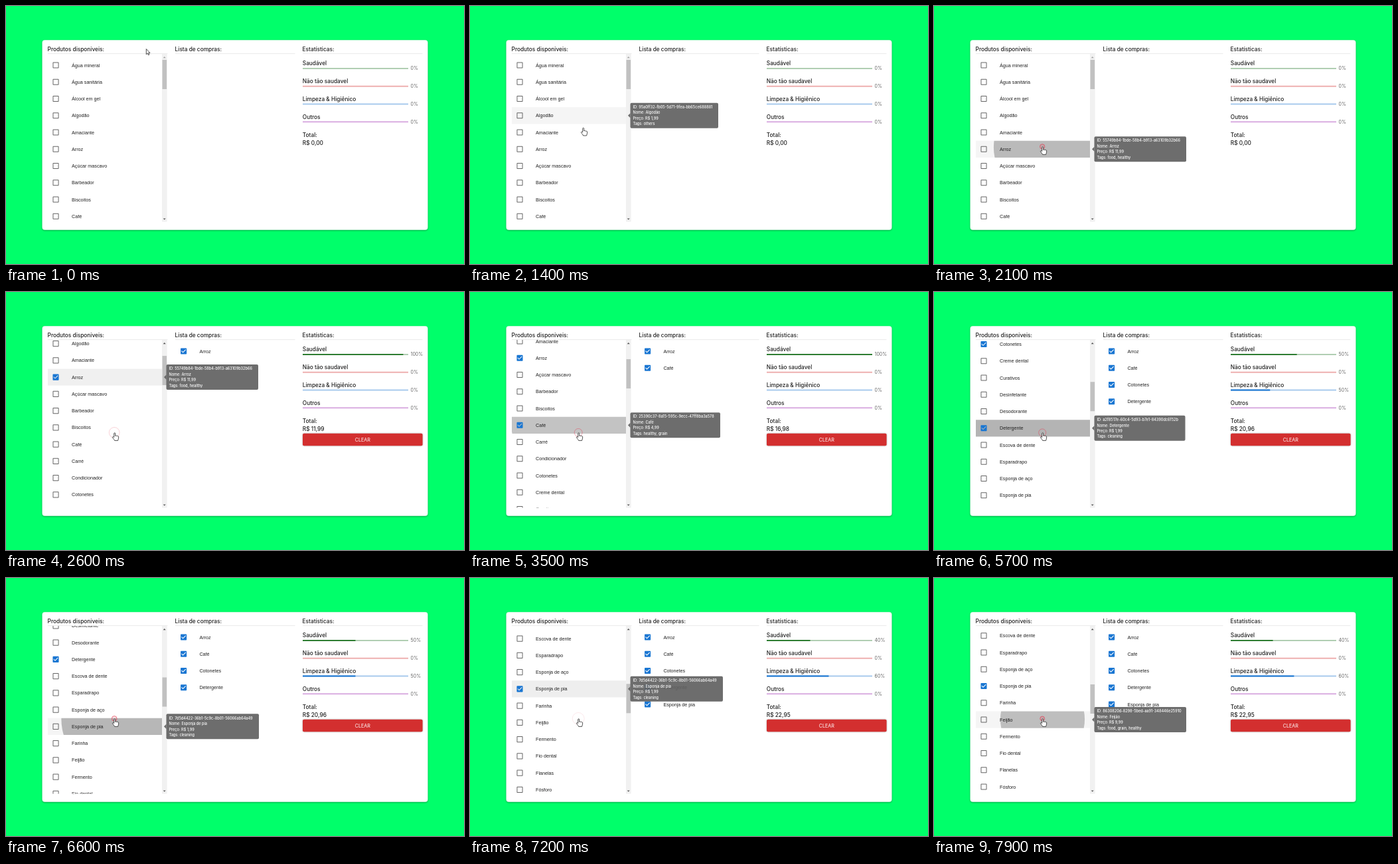
Animation, 690 px wide and 388 px high, one loop 8 s. Source, as an HTML page:

```html
<!DOCTYPE html>
<html lang="pt-BR">
<head>
<meta charset="utf-8">
<title>Lista de compras</title>
<style>
  html, body { margin: 0; width: 100%; height: 100%; overflow: hidden; background: #00ff6a; }
  svg { display: block; width: 690px; height: 388px; }
  text { font-family: "Liberation Sans", Arial, sans-serif; font-size: 7.2px; fill: #212121; }
  .head { font-family: Poppins, Inter, sans-serif; font-size: 8.3px; font-weight: 500; }
  .pct { font-family: Poppins, Inter, sans-serif; font-size: 7px; fill: #666; }
  .tip { font-family: Poppins, Inter, sans-serif; font-size: 5.55px; font-weight: 500; fill: #fff; }
  .btn { font-family: Poppins, Inter, sans-serif; font-size: 7.2px; fill: #fff; text-anchor: middle; }
  .card { filter: drop-shadow(0 1px 1px rgba(0, 0, 0, .35)); }
  .lift { filter: drop-shadow(0 .8px .8px rgba(0, 0, 0, .35)); }
</style>
</head>
<body>
<svg id="stage" viewBox="0 0 690 388" xmlns="http://www.w3.org/2000/svg"></svg>
<script>
const LOOP = 8000, PITCH = 25.25, FIRST = 89;

const names = ('Água mineral,Água sanitária,Álcool em gel,Algodão,Amaciante,Arroz,Açúcar mascavo,' +
  'Barbeador,Biscoitos,Café,Carré,Condicionador,Cotonetes,Creme dental,Curativos,Desinfetante,' +
  'Desodorante,Detergente,Escova de dente,Esparadrapo,Esponja de aço,Esponja de pia,Farinha,' +
  'Feijão,Fermento,Fio dental,Flanelas,Fósforo,Fraldas,Frango').split(',');

// row: [id, price, tags, tooltip width]
const info = {
  0: ['4c1e70a9-52d3-5b08-91fc-3d86e0b7a254', '2,99', 'food, healthy', 137],
  1: ['e83b2d56-07fa-5c41-8d29-b1690c4e73f8', '3,99', 'cleaning', 137],
  2: ['1f96c8b3-4e20-57da-a6b5-70d8f3219ce4', '4,99', 'hygiene', 138],
  3: ['95a0ff32-fb05-5d71-9fea-bb65ce688881', '1,99', 'others', 132.5],
  4: ['c07d4a18-93be-5f62-84d0-29e5a6f13b7c', '7,99', 'cleaning', 137],
  5: ['55749b84-1bde-58b4-b913-a63109b32b66', '11,99', 'food, healthy', 138.5],
  9: ['25390c37-8a15-595c-9ecc-47ff8ba3a578', '4,99', 'healthy, grain', 135.5],
  12: ['6b03e468-3776-510e-80e5-5ef8e337cbc3', '1,99', 'hygiene', 136.5],
  17: ['a2f8517e-60c4-5d93-b7e1-84390dc6f52b', '1,99', 'cleaning', 137],
  21: ['7d5d4422-36b1-5c9c-8b01-56066ab64a49', '1,99', 'cleaning', 139.5],
  23: ['8630820d-8298-5bed-aa91-348446e25910', '9,99', 'food, grain, healthy', 138.5]
};

const hovers = [[230, 0], [400, 1], [560, 2], [970, 3], [1430, 4], [1680, 5],
  [2720, 9], [3820, 12], [4940, 17], [6080, 21], [7330, 23]];
const presses = [ // down, up, row, total, healthy %, cleaning %
  [1850, 2220, 5, '11,99', 100, 0],
  [2975, 3345, 9, '16,98', 100, 0],
  [4110, 4480, 12, '18,97', 67, 33],
  [5230, 5600, 17, '20,96', 50, 50],
  [6325, 6850, 21, '22,95', 40, 60],
  [7680, 8050, 23, '', 40, 60]];
const scrolls = [[2256, 91.35], [3362, 91.35], [4482, 121.8], [5620, 91.4], [6870, 60.85]];
const path = [[0, 211, 64], [100, 211, 64], [650, 188, 149], [900, 187, 150],
  [1400, 170.8, 183.3], [1740, 163.8, 211.8], [8000, 163.8, 211.8]];

const clamp = x => Math.max(0, Math.min(1, x));
const mix = (a, b, p) => a + (b - a) * p;

// cubic-bezier(.4, 0, .2, 1)
function ease(x) {
  x = clamp(x);
  let lo = 0, hi = 1;
  for (let i = 0; i < 22; i++) {
    const m = (lo + hi) / 2, n = 1 - m;
    if (1.2 * n * n * m + .6 * n * m * m + m * m * m < x) lo = m; else hi = m;
  }
  return 3 * (1 - lo) * lo * lo + lo ** 3;
}

const scrollAt = t => scrolls.reduce((s, [at, d]) =>
  s + d * (1 - Math.cos(Math.PI * clamp((t - at) / 400))) / 2, 0);

function pointer(t) {
  const i = path.findIndex(k => k[0] > t), a = path[i - 1], b = path[i];
  const p = (t - a[0]) / (b[0] - a[0]);
  return [mix(a[1], b[1], p), mix(a[2], b[2], p)];
}

const stage = document.getElementById('stage');
function add(parent, tag, attrs = {}, content) {
  const el = document.createElementNS('http://www.w3.org/2000/svg', tag);
  for (const k in attrs) el.setAttribute(k, attrs[k]);
  if (content !== undefined) el.textContent = content;
  parent.append(el);
  return el;
}
const set = (el, k, v) => el.setAttribute(k, v);
const show = (el, on) => set(el, 'visibility', on ? 'visible' : 'hidden');
const rect = (parent, x, y, width, height, fill, rx = 0) =>
  add(parent, 'rect', { x, y, width, height, fill, rx });
const label = (parent, x, y, s, cls = '') => add(parent, 'text', { x, y, class: cls }, s);
const rowY = i => FIRST + PITCH * i;

function clip(id, x, y, w, h) {
  rect(add(stage, 'clipPath', { id }), x, y, w, h, '#000');
}

const BOX = 'M19 5v14H5V5h14m0-2H5c-1.1 0-2 .9-2 2v14c0 1.1.9 2 2 2h14c1.1 0 2-.9 2-2V5c0-1.1-.9-2-2-2z';
const TICK = 'M19 3H5c-1.11 0-2 .9-2 2v14c0 1.1.89 2 2 2h14c1.11 0 2-.9 2-2V5c0-1.1-.89-2-2-2zm-9 14l-5-5 1.41-1.41L10 14.17l7.59-7.59L19 8l-9 9z';
const icon = (parent, x, y, d, fill) => add(parent, 'path',
  { d, fill, transform: `translate(${x - 6.06} ${y - 6.06}) scale(.505)` });

// Card and headings
rect(stage, 54.5, 51.2, 581, 285.6, '#fff', 4).classList.add('card');
[[63, 'Produtos disponiveis:'], [255, 'Lista de compras:'], [447, 'Estatísticas:']].forEach(([x, s]) => {
  label(stage, x - .4, 68.3, s, 'head');
  rect(stage, x, 71.5, 180.5, .6, '#dcdcdc');
});

// Product list
clip('view', 63, 72, 172, 252.5);
const view = add(stage, 'g', { 'clip-path': 'url(#view)' });
const list = add(view, 'g');
const shades = hovers.map(([, i]) => rect(list, 63, rowY(i) - PITCH / 2, 172, PITCH, '#f5f5f5'));
const ripples = presses.map(([down, , i], n) => {
  clip('row' + n, 63, rowY(i) - PITCH / 2, 172, PITCH);
  const g = add(list, 'g', { 'clip-path': `url(#row${n})` });
  return add(g, 'circle', { cx: 163.5, cy: 212.5 + scrollAt(down), r: 0, fill: '#000' });
});
const rows = names.map((s, i) => {
  const y = rowY(i);
  label(list, 99, y + 2.5, s);
  return { off: icon(list, 75, y, BOX, '#666'), on: icon(list, 75, y, TICK, '#1976d2') };
});

// Scrollbar
rect(stage, 235, 72, 7.6, 252.5, '#f1f1f1');
const thumb = rect(stage, 235.5, 81, 6.6, 44, '#c1c1c1');
const up = add(stage, 'path', { d: 'M236.7 78.2h4l-2-2.2z' });
add(stage, 'path', { d: 'M236.7 319.4h4l-2 2.2z', fill: '#505050' });

// Shopping list
const bought = presses.slice(0, 5).map(([, , i], n) => {
  const g = add(stage, 'g');
  icon(g, 267.6, rowY(n), TICK, '#1976d2');
  label(g, 291.4, rowY(n) + 2.5, names[i]);
  return g;
});

// Statistics
const meters = [['Saudável', '#2e7d32', '#b0ceb2'], ['Não tão saudavel', '#d32f2f', '#eeb0b0'],
  ['Limpeza & Higiênico', '#1976d2', '#a7caed'], ['Outros', '#9c27b0', '#d9ade1']].map(([s, fg, bg], n) => {
  const y = 94 + n * 26.75;
  label(stage, 446.8, y - 4.6, s, 'head');
  rect(stage, 447, y - 1, 159, 2, bg);
  return { bar: rect(stage, 447, y - 1, 0, 2, fg), pct: label(stage, 609.6, y + 2.3, '0%', 'pct') };
});
label(stage, 446.8, 196.7, 'Total:', 'head');
const total = label(stage, 446.8, 209.2, '', 'head');
const button = add(stage, 'g');
rect(button, 447, 212.8, 180.6, 18.5, '#d32f2f', 2).classList.add('lift');
label(button, 537.3, 224.6, 'CLEAR', 'btn');

// Tooltips
const tips = hovers.map(([, i]) => {
  const [id, price, tags, w] = info[i], g = add(stage, 'g');
  add(g, 'path', { d: 'M241.5 -3.6L238 0L241.5 3.6z', fill: '#616161', 'fill-opacity': .92 });
  add(g, 'rect', { x: 241.5, y: -19, width: w, height: 38, rx: 2, fill: '#616161', 'fill-opacity': .92 });
  ['ID: ' + id, 'Nome: ' + names[i], 'Preço: R$ ' + price, 'Tags: ' + tags].forEach((s, n) =>
    label(g, 245.5, -10.8 + n * 8.5, s, 'tip'));
  return g;
});

// Pointer
const ring = add(stage, 'circle', { fill: '#e53950', stroke: '#e53950', 'stroke-width': .9 });
const ink = { fill: '#fff', stroke: '#222', 'stroke-width': .8, 'stroke-linejoin': 'round' };
const arrow = add(stage, 'path', { ...ink, d: 'M.3 .6V8.8L2.2 7.1L3.5 9.8L4.8 9.2L3.6 6.6H6z' });
const hand = add(stage, 'path', { ...ink, d: 'M-1.1 6.6V1a1 1 0 0 1 2 0v3.6c.3-.7 1.5-.7 1.8.1' +
  '.4-.5 1.5-.4 1.7.4.5-.4 1.4-.1 1.4.7V8c0 1.6-1 2.2-1 3.6H-.2C-.6 10.2-2 8.9-3.2 7.2c-.6-1 .5-1.7 1.2-1.1z' });

function render(t) {
  const s = scrollAt(t);
  set(list, 'transform', `translate(0 ${-s})`);
  set(thumb, 'y', 81 + s * .173);
  set(up, 'fill', s > 0 ? '#505050' : '#a3a3a3');

  hovers.forEach(([on, i], n) => {
    const off = n + 1 < hovers.length ? hovers[n + 1][0] : LOOP + 999;
    const grow = ease((t - on) / 200), fade = 1 - ease((t - off) / 150);
    set(shades[n], 'opacity', clamp((t - on) / 120) * clamp(1 - (t - off) / 120));
    set(tips[n], 'opacity', grow * fade);
    const k = mix(.75, 1, grow), y = rowY(i) - s;
    set(tips[n], 'transform', `translate(${238 * (1 - k)} ${y}) scale(${k})`);
    show(tips[n], t > on && t < off + 150);
  });

  let age = -1;
  presses.forEach(([down, release], n) => {
    const e = ease((t - down) / 550);
    set(ripples[n], 'r', 103 * e);
    set(ripples[n], 'opacity', t < down ? 0 : (.1 + .2 * e) * (1 - ease((t - release) / 550)));
    if (t >= down) age = t - down;
  });
  const done = presses.filter(p => t >= p[1]);
  rows.forEach((r, i) => {
    const on = done.some(p => p[2] === i);
    show(r.on, on);
    show(r.off, !on);
  });
  bought.forEach((g, n) => show(g, n < done.length));

  const none = [0, -LOOP, 0, '0,00', 0, 0];
  const cur = done[done.length - 1] || none, prev = done[done.length - 2] || none;
  const p = clamp((t - cur[1]) / 400);
  [4, 0, 5, 0].forEach((k, n) => {
    const to = k && cur[k], from = k && prev[k];
    set(meters[n].bar, 'width', 1.59 * mix(from, to, p));
    meters[n].pct.textContent = to + '%';
  });
  total.textContent = 'R$ ' + cur[3];
  show(button, done.length > 0);

  const [x, y] = pointer(t), over = y > 76;
  show(arrow, !over);
  show(hand, over);
  for (const el of [arrow, hand]) set(el, 'transform', `translate(${x} ${y})`);
  show(ring, age >= 0 && age < 900);
  set(ring, 'cx', 163.2);
  set(ring, 'cy', 211.4);
  set(ring, 'r', 1.5 + Math.max(0, age) * .0085);
  set(ring, 'stroke-opacity', clamp(1 - age / 1000));
  set(ring, 'fill-opacity', .35 * clamp(1 - age / 450));
}

const start = performance.now();
function tick(now) {
  render(Math.max(0, now - start) % LOOP);
  requestAnimationFrame(tick);
}
render(0);
requestAnimationFrame(tick);
</script>
</body>
</html>
```
